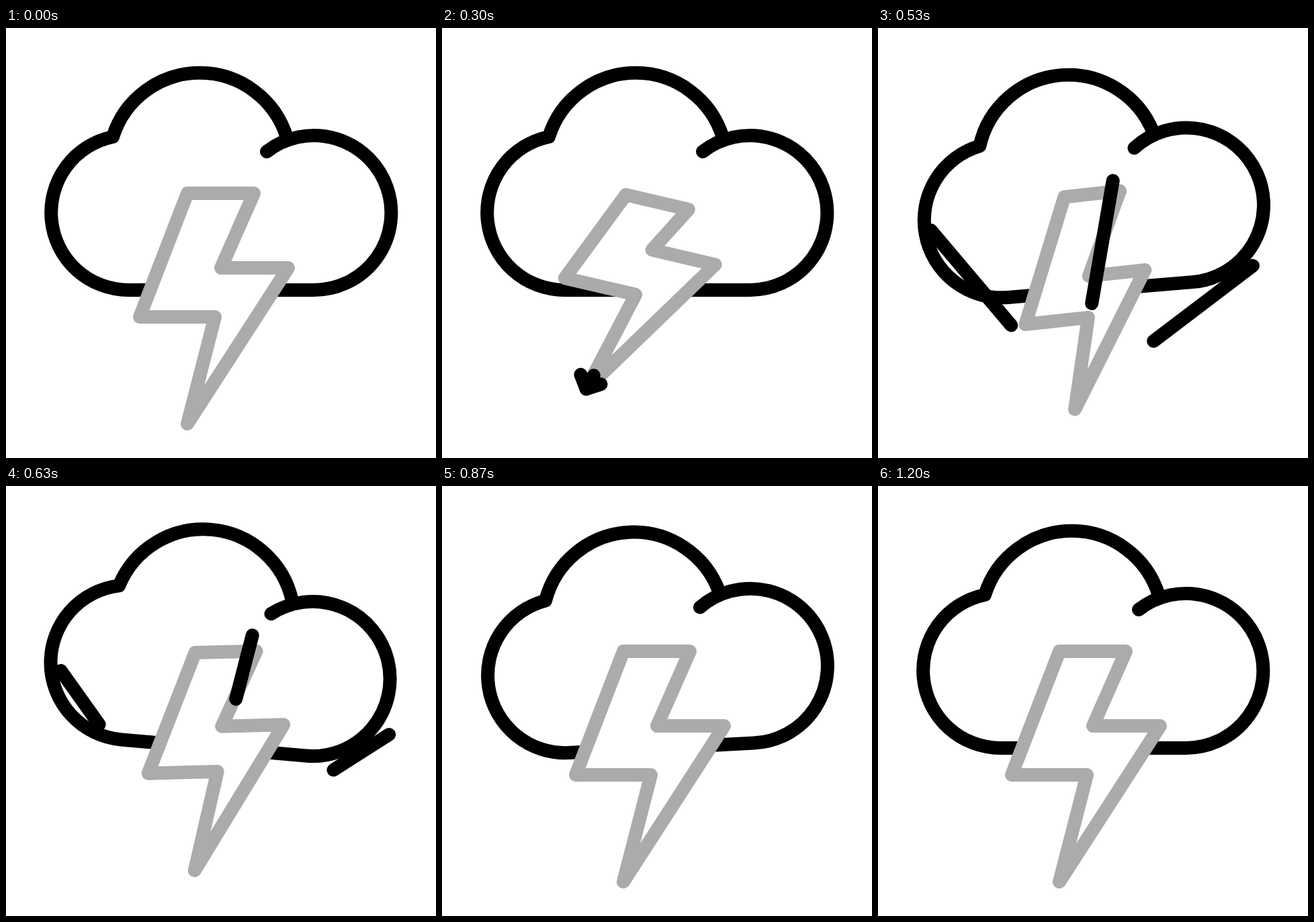
These frames come from a looping animation (640 by 640 pixels, 1.67 s). An HTML page:

```html
<!DOCTYPE html>
<html lang="en">
<head>
<meta charset="utf-8">
<title>Thunderstorm</title>
<style>
  html, body { margin: 0; width: 100%; height: 100%; overflow: hidden; background: #fff; }
  svg { display: block; width: 100%; height: 100%; }
  path { fill: none; stroke: #000; stroke-width: 20; stroke-linecap: round; stroke-linejoin: round; }
  #bolt { fill: #fff; stroke: #ababab; }
</style>
</head>
<body>
<svg viewBox="0 0 640 640">
  <path id="cloud" d="M418 163A135.5 135.5 0 0 0 159 162A115.2 115.2 0 0 0 182 390H458A115 115 0 1 0 388 184"/>
  <path id="bolt"/>
  <path id="rays"/>
</svg>
<script>
const LOOP = 1670, FPS = 30;
const [cloud, bolt, rays] = ['cloud', 'bolt', 'rays'].map(id => document.getElementById(id));
const rad = Math.PI / 180;

const progress = (f, from, to) => Math.min(1, Math.max(0, (f - from) / (to - from)));
const ease = p => p * p * (3 - 2 * p);

// Eases from key to key; each key is { f, ...numbers }.
function pose(keys, f) {
  const next = keys.findIndex(k => k.f > f);
  if (next === 0) return keys[0];
  if (next < 0) return keys[keys.length - 1];
  const a = keys[next - 1], b = keys[next], p = ease(progress(f, a.f, b.f));
  return Object.fromEntries(Object.keys(a).map(k => [k, a[k] + (b[k] - a[k]) * p]));
}

const sway = [
  { f: 9, turn: 0 }, { f: 13, turn: -14.5 }, { f: 19, turn: 5 },
  { f: 26, turn: -3 }, { f: 32, turn: 2 }, { f: 36, turn: 0 }
];

// Bolt: centre, turn, size, and how far its top edge slides.
const rest = { x: 310, y: 418, turn: 0, size: 1, topX: 0, topY: 0 };
const strike = [
  { f: 0, ...rest },
  { f: 6, x: 284, y: 375.5, turn: 18.5, size: 1, topX: -17, topY: 57 },
  { f: 16, x: 311, y: 421, turn: -6.2, size: .84, topX: 22, topY: -33 },
  { f: 22, x: 316, y: 407, turn: 3.2, size: 1, topX: -2, topY: 14.5 },
  { f: 26, ...rest }
];
const topEdge = [[-40, -172], [59, -172]];
const tip = [-40, 171];
const lower = [[10, -61], [110, -61], tip, [1, 12], [-111, 12]];

const RAY = 343, rayAngles = [-34, 16, 59];

function draw(ms) {
  const f = Math.floor((ms + 3.4) * FPS / 1000);
  cloud.setAttribute('transform', `rotate(${pose(sway, f).turn} 320 261)`);

  const at = pose(strike, f);
  const c = Math.cos(at.turn * rad) * at.size, s = Math.sin(at.turn * rad) * at.size;
  const place = ([x, y]) => [at.x + x * c - y * s, at.y + x * s + y * c];
  const top = topEdge.map(([x, y]) => [x + at.topX, y + at.topY]);
  bolt.setAttribute('d', 'M' + [...top, ...lower].map(place).join('L') + 'Z');

  // Rays shoot out of the tip, rising a little as they go.
  const head = RAY * ease(progress(f, 7.5, 17)), tail = RAY * progress(f, 11.5, 22);
  const [x, y] = place(tip);
  const along = (angle, r) => {
    const a = (angle + at.turn) * rad;
    return [x + r * Math.sin(a), y - 1.8 * (f - 9) - r * Math.cos(a)];
  };
  rays.setAttribute('d', head > tail
    ? rayAngles.map(a => `M${along(a, tail)}L${along(a, head)}`).join('')
    : '');
}

const start = performance.now();
function tick() {
  draw((performance.now() - start) % LOOP);
  requestAnimationFrame(tick);
}
tick();
</script>
</body>
</html>
```
